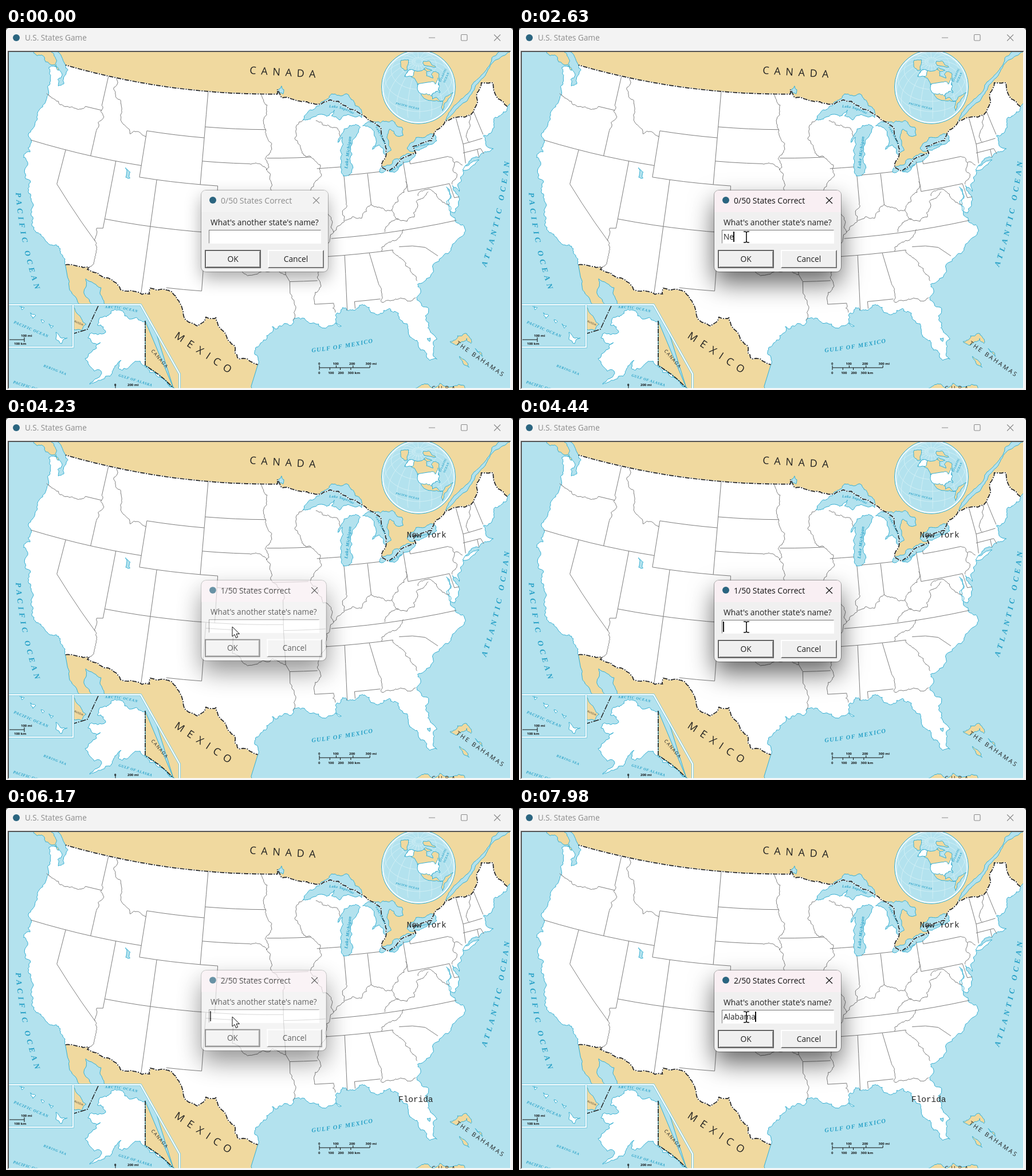
Write an HTML page that moves like this. It is 885 px wide and 633 px high and loops after 8000 ms.

```html
<!DOCTYPE html>
<html lang="en">
<head>
<meta charset="utf-8">
<title>States quiz</title>
<style>
  html, body { margin: 0; width: 100%; height: 100%; overflow: hidden; background: #555; }
  div, span, i { position: absolute; box-sizing: border-box; white-space: pre; }
  #stage, svg { position: absolute; left: 0; top: 0; width: 885px; height: 633px; overflow: hidden; }
  #stage { background: #f0f0f0; border-radius: 6px 6px 0 0; font: 13.8px/20px "Open Sans", "Noto Sans", sans-serif; color: #222; }
  #bar { left: 0; top: 0; width: 885px; height: 39px; background: #f3f3f3; color: #8b8b8b; }
  #bar.on, #dialog.on .title { color: #111; }
  #bar span { left: 33px; top: 7px; font-size: 13.6px; }
  .icon { width: 12px; height: 12px; border-radius: 50%; background: #2b6580; }
  #dialog { left: 341px; top: 284px; width: 221px; height: 142px; border-radius: 8px; background: #f0f0f0;
    transform-origin: 16px 19px; box-shadow: 0 0 0 1px #0004, 0 12px 30px #0005; }
  #dialog.on { box-shadow: 0 0 0 1px #0005, 0 20px 44px #0009; }
  .title { left: 0; top: 0; width: 221px; height: 38px; border-radius: 8px 8px 0 0; background: #f3f3f3; color: #8b8b8b; }
  #dialog.on .title { background: #f9eff3; }
  #score { left: 34px; top: 8px; font-size: 14px; }
  #entry { left: 13px; top: 69px; width: 196px; height: 24px; background: #fff; border: 1px solid; border-color: #777 #fff #fff #777; }
  #typed { position: static; font-size: 13.6px; line-height: 22px; margin-left: 2px; }
  #caret { position: relative; display: inline-block; width: 2px; height: 18px; margin: 0 -1px; vertical-align: -4px; background: #111; }
  .button { top: 104px; width: 98px; height: 32px; text-align: center; line-height: 28px; background: #f0f0f0;
    border: 2px solid; border-color: #fff #777 #777 #fff; }
  .button.main { border-color: #646464; box-shadow: inset 1px 1px #fff, inset -1px -1px #999; }
</style>
</head>
<body>
<div id="stage">
  <svg id="map" viewBox="0 0 885 633"></svg>
  <div id="bar">
    <i class="icon" style="left:12px;top:11px"></i><span>U.S. States Game</span>
    <svg viewBox="0 0 885 633" fill="none" stroke="currentColor" stroke-width="1.1">
      <path d="M738 17H749M852 11.500L863 22.500M863 11.500L852 22.500"/>
      <rect x="794.500" y="11.500" width="10.500" height="10.500" rx="1.500"/>
    </svg>
  </div>
  <div id="dialog">
    <div class="title">
      <i class="icon" style="left:14px;top:11px"></i><span id="score"></span>
      <svg viewBox="0 0 885 633" stroke="currentColor" stroke-width="1.2"><path d="M195 12L206 23M206 12L195 23"/></svg>
    </div>
    <span style="left:16px;top:46px">What's another state's name?</span>
    <div id="entry"><span id="typed"></span><i id="caret"></i></div>
    <div class="button main" style="left:6px">OK</div>
    <div class="button" style="left:116px">Cancel</div>
  </div>
  <svg viewBox="0 0 885 633">
    <path id="arrow" d="M0 0V17L4 13.500 6.500 19.500 9.500 18.200 7 12.500H12.500Z" fill="#fff" stroke="#111"/>
    <path id="beam" d="M392 356H395.500L397 357.500 398.500 356H402M397 357V374M392 375H395.500L397 373.500 398.500 375H402" fill="none" stroke="#111" stroke-width="1.600"/>
  </svg>
</div>
<script>
const $ = id => document.getElementById(id);
const { sin, cos, sqrt, ceil, floor, hypot, abs, min, max, PI } = Math;
const SEA = '#b3e2ee', SAND = '#f0d99f', COAST = '#35afd2', INK = '#222', RAD = PI / 180;

// Projections of degrees west and north
function conic(w, n) {
  const k = .6029, r = 1170 * sqrt(1.3513 - 2 * k * sin(n * RAD)) / k, a = k * (96 - w) * RAD;
  return [462 + r * sin(a), r * cos(a) - 1173.5];
}
function globe(w, n) {
  const lon = (122 - w) * RAD, lat = n * RAD, tilt = 44 * RAD;
  const x = cos(lat) * sin(lon);
  const y = cos(tilt) * sin(lat) - sin(tilt) * cos(lat) * cos(lon);
  const front = sin(tilt) * sin(lat) + cos(tilt) * cos(lat) * cos(lon);
  const r = 62 / (front < 0 ? hypot(x, y) : 1);
  return [720 + r * x, 103 - r * y];
}
const flat = (x, y) => [x, y];

let seed = 7;
const random = () => (seed = seed * 16807 % 2147483647) / 2147483647;

// Polyline through the places; rough > 0 breaks it up by midpoint displacement
function trace(places, rough = 0, project = conic) {
  const p = places.trim().split(/\s+/).map(Number), points = [];
  for (let i = 0; i < p.length - 2; i += 2) {
    const dx = p[i + 2] - p[i], dy = p[i + 3] - p[i + 1];
    const steps = project === flat || rough ? 1 : ceil(max(abs(dx), abs(dy)) / 2);
    for (let s = 0; s < steps; s++) points.push(project(p[i] + dx * s / steps, p[i + 1] + dy * s / steps));
  }
  points.push(project(...p.slice(-2)));
  const split = (a, b) => {
    const dx = b[0] - a[0], dy = b[1] - a[1];
    if (!rough || hypot(dx, dy) < 4) return [b];
    const shift = rough * (random() - .5);
    const mid = [(a[0] + b[0]) / 2 - dy * shift, (a[1] + b[1]) / 2 + dx * shift];
    return [...split(a, mid), ...split(mid, b)];
  };
  return points.flatMap((q, i) => i ? split(points[i - 1], q) : [q]).map(q => q.map(v => v.toFixed(1)).join(' ')).join(' ');
}

const path = (d, style) => `<path d="M${d}" ${style}/>`;
const fill = (d, color, edge = COAST) => path(d + 'Z', `fill="${color}" stroke="${edge}"`);
const line = (d, color, width = 1, dash = '') =>
  path(d, `fill="none" stroke="${color}" stroke-width="${width}" stroke-dasharray="${dash}"`);
const border = d => line(d, '#fff', 1.8) + line(d, INK, 1.7, '8 2 2 2');
const all = (list, draw) => list.map(draw).join('');

// Outline of the country, counterclockwise from the north-west
const WEST = '122.76 49 122.4 48.2 122.3 47.4 122.9 47.1 122.8 48.1 124.7 48.4 124.1 46.9 124 45 124.5 42.8 124.1 41.7 124.4 40.4 123.8 39.2 122.5 37.6 121.9 36.6 120.6 34.6 118.5 34 117.1 32.5 ';
const SOUTH = '117.1 32.5 114.7 32.7 114.8 32.5 111.1 31.3 108.2 31.3 108.2 31.8 106.5 31.8 104.9 30.6 104.5 29.6 103.1 29 102.4 29.8 101.4 29.8 100.3 28.3 99.5 27.5 99.1 26.4 97.2 25.9 ';
const GULF = '97.2 25.9 97.4 27.4 96.4 28.4 94.8 29.3 93.8 29.7 92.3 29.5 91.3 29.3 90.2 29.1 89.1 29 89.5 30.1 88 30.3 86.2 30.4 85.3 29.7 84.2 30.1 83.4 29.6 82.7 28.6 82.7 27.7 81.8 26.2 81.1 25.2 80.4 25.2 ';
const EAST = '80.4 25.2 80.1 26.9 80.6 28.4 81.4 30.5 81.1 31.8 79.3 33.1 77.9 33.9 76.6 34.7 75.5 35.2 76 36.8 76.4 37.2 76.3 38.2 76.2 39.5 75.9 37.2 75.1 38.4 75.5 39.5 74.9 38.9 74 40.5 73.6 40.9 71.9 41.3 70.7 41.6 70 41.7 70.7 42.1 70.7 43 69 44.1 67 44.8 ';
const NORTH = '67 44.8 67.8 45.7 67.8 47.1 69.2 47.4 70 46.7 70.3 45.9 71.5 45 74.7 45 76.3 44.2 76.8 43.6 79.1 43.4 78.9 42.8 82.4 41.7 83.1 42.1 82.4 43 82.5 45.3 83.6 46.1 84.9 46.9 88.4 48.3 89.6 48 92 48.3 94.6 48.7 95.15 49.4 95.15 49 ';
const west = trace(WEST, .5), south = trace(SOUTH, .25), gulf = trace(GULF, .6), east = trace(EAST, .5);
const north = trace(NORTH, .2) + ' ' + trace('95.15 49 122.76 49');

const lakes = [
  '92 46.7 90.8 46.9 89 46.9 88 47.4 88.4 46.9 87.4 46.5 85 46.7 84.7 46.5 84.8 47.3 86.3 48.7 88.2 48.8 89.3 48.2 90.5 47.6 92 46.7',
  '87.6 41.7 87 41.7 86.4 42.3 86.5 43.8 86.1 44.7 85 45.7 85.5 46 87 45.7 87.9 44.6 87.3 45 87.7 43.9 87.8 42.5 87.6 41.7',
  '84.7 45.8 83.4 45.2 83.3 44.3 83.9 43.7 83 44 82.4 43 81.7 43.4 81.5 45.2 80.9 44.6 80 44.5 80 45.2 81 45.9 84 46.1 84.7 45.8',
  '83.4 41.7 81.7 41.5 80 42.2 78.9 42.8 80.2 42.8 81.5 42.6 83.1 42.1 83.4 41.7',
  '79.8 43.3 77 43.3 76.2 43.5 76.4 44.1 77.5 44 79.4 43.7 79.8 43.3',
  '112.8 41.6 112.2 41.3 112.1 40.8 112.6 40.8 112.8 41.6', '95.2 49.1 94.6 49.7 94.4 49 95.2 49.1', '81 27.1 80.7 27.1 80.8 26.8 81 27.1'
];
const straight = [
  '117.04 49 117.04 46.4', '119 46 116.9 46', '124.2 42 111.05 42', '120 42 120 39 114.6 35', '114.04 42 114.04 36.2 114.7 36.1', '117.03 44.2 117.03 42',
  '104.05 45 111.05 45 111.05 41 102.05 41 102.05 37', '104.05 49 104.05 41', '109.05 41 109.05 31.3', '104.05 45.94 96.6 45.94', '104.05 43 98.5 43',
  '102.05 40 95.3 40', '114.04 37 94.62 37', '103 37 103 32 106.6 32', '103 36.5 100 36.5 100 34.5', '94.62 39.1 94.62 36.5 94.45 33.6 94.04 33 91.2 33', '94.04 33 94.04 32'
];
const older = [
  '94.62 36.5 90.1 36.5', '96.45 43.5 91.2 43.5', '95.8 40.6 91.7 40.6', '90.6 42.5 87.8 42.5', '87.53 41.7 87.53 39.4', '84.8 41.7 84.8 39.1', '87 41.75 83.4 41.73',
  '80.52 42.3 80.52 39.72 75.8 39.72 75.6 38.46 75.05 38.45', '79.76 42.3 79.76 42 75.3 42', '89.5 36.5 75.9 36.55', '90.3 35 83.1 35', '88.2 35 88.4 30.3', '85.6 35 85 32.3',
  '87.6 30.4 87.6 31 85 31', '91.6 31 89.7 31', '73.35 45 73.25 42.7 73.5 41.1', '73.25 42.74 70.9 42.8', '73.5 42 71.4 42 71.2 41.5', '71.8 42 71.85 41.3', '71.1 45.3 70.7 43.1', '82.4 35.2 81 35.1 79.7 34.8 78.55 33.9'
];
const rivers = [
  '124 46.2 122.8 45.9 121.2 45.6 119 46', '117.04 46.4 116.5 45.5 117.03 44.2', '116.05 49 116.05 48 114.6 46.6 114.4 45.5 113 44.5 111.05 44.5', '114.7 36.1 114.6 35 114.3 34.2 114.7 32.7',
  '98.5 43 96.5 42.5 95.8 40.6 94.62 39.1', '97.2 49 96.8 47 96.6 45.94 96.45 42.5', '100 34.5 97.2 33.8 94.45 33.6',
  '92 46.7 92.9 45.6 92.7 44.7 91.2 43.5 90.2 41.8 91.1 41 91.4 40.4 90.2 38.7 89.2 37 90.1 35 91.1 33.6 91.1 32.2 91.6 31', '90.4 46.6 88.1 45.9 87.6 45.1'
];
const eastRivers = [
  '87.53 39.4 88 37.9', '89.2 37 88 37.8 86 38 84.8 39.1 82.6 38.4 81.8 39 80.6 40.6', '82.6 38.4 82 37.5 83.7 36.6', '82 37.5 80.3 37.5 78.3 39.4',
  '79.5 39.2 78.4 39.6 77.7 39.3 77 38.3 76.3 38', '84.3 35 83 35.8 81.7 36.6', '83.1 35 82 33.5 81.1 32.1', '85 32.3 84.9 30.7 82.2 30.5 81.5 30.7',
  '94.04 32 93.6 31 93.8 29.7', '89.7 31 89.6 30.2', '75.3 42 74.7 41.36 75.1 40.7 74.8 40.2 75.5 39.6', '74.7 41.36 73.9 41', '71.5 45 72 44 72.5 42.74'
];
const islands = ['123.4 48.4 125 48.8 128 50.5 127 50.8 124.8 49.7 123.4 48.4', '84 22.8 82.4 23.1 80.5 23.1 78 22 84 21',
  '78.9 26.5 77.2 26.9 77 26 77.3 26.5 78.9 26.5', '78.3 25.1 77.8 24.6 77.6 24 78.1 24.5 78.3 25.1', '76.7 25.5 76.2 25 76.2 24.7'];

const land = fill(north + ' ' + trace('123.2 49.3 125 50.2 128 51.5 128 58 60 58 60 46 66 45.2', .2), SAND) +
  fill(south + ' ' + trace('97.8 24 97.7 22 105 21 109 25 112.3 29 113.1 31.2 114.8 31.7 114.7 30.5 113 28 112 26 114 28 115.8 30.2 116.6 31.5', .3), SAND) +
  fill(trace('74.7 45 71.2 46.8 69.5 47.8 67 49.2 62 50 64 49.2 67.5 48.6 70 47.3 73.5 45.5', .2), SEA) +
  path([west, south, gulf, east, north].join(' ') + 'Z', 'fill="#fff"') +
  all([west, gulf, east], d => line(d, COAST)) +
  all(islands, d => fill(trace(d, .5), SAND)) +
  fill(trace('74 40.6 72.5 40.8 71.9 41.1 73.6 40.9', .3), '#fff') +
  all(lakes, d => fill(trace(d, .4), SEA)) +
  all([...straight, ...older], d => line(trace(d), '#7d7d7d')) +
  all([...rivers, ...eastRivers], d => line(trace(d, .45), '#7d7d7d')) +
  border(north) + border(south);

const around = '168 66 156 71 128 70 95 72 82 68 95 60 88 57 80 52 78 59 65 60 56 52 66 45 76 36 81 31 80 25 83 30 90 30 97 27 97 20 90 21 83 10 78 8 85 11 95 16 105 20 117 32 124 40 124 48 135 58 150 60 165 55';
const onGlobe = d => trace(d, .3, globe);
const rings = Array.from({ length: 18 }, (_, i) => `${i * 20} -20 ${i * 20} 85`)
  .concat([0, 20, 40, 60, 80].map(n => `0 ${n} 360 ${n}`));
const world = `<circle cx="720" cy="103" r="64.500" fill="${SEA}" stroke="${COAST}"/><circle cx="720" cy="103" r="62.500" fill="none" stroke="#fff" stroke-width="2"/>` +
  all(rings, d => line(trace(d, 0, globe), '#d9f1f7', .8)) +
  all([around, '73 78 60 82 25 82 20 72 43 60 53 68', '172 66 190 70 235 72 235 58 200 60 180 62', '78 8 72 12 60 8 45 0 78 -15 80 0', '85 66 65 63 78 73 90 73'], d => fill(onGlobe(d), SAND)) +
  fill(onGlobe(WEST + SOUTH + GULF + EAST + NORTH), '#fff') + fill(onGlobe('141 70 141 60 152 59 163 55 165 62 166 68 156 71'), '#fff');

// Lettering
const label = (x, y, turn, size, gap, text, color = INK, font = 'Open Sans,sans-serif', extra = 'font-weight="500"') =>
  `<text transform="translate(${x} ${y})rotate(${turn})" font-family="${font}" font-size="${size}" letter-spacing="${gap}" fill="${color}" ${extra}>${text}</text>`;
const water = (x, y, turn, size, gap, text) =>
  label(x, y, turn, size, gap, text, '#249fc6', 'Liberation Serif,serif', 'font-style="italic" font-weight="bold"');
let curves = 0;
const curved = (d, size, gap, text) => `<path id="curve${++curves}" d="${d}" fill="none"/>` +
  water(0, 0, 0, size, gap, `<textPath href="#curve${curves}">${text}</textPath>`);
const small = (x, y, text) => label(x, y, 0, 6, 0, text, '#111', 'Open Sans,sans-serif', 'font-weight="bold"');

const names = curved('M564 139Q590 139 612 155', 6.5, .5, 'Lake Superior') + water(596, 246, -83, 8, .5, 'Lake Michigan') +
  water(645, 173, 63, 6, .4, 'Lake Huron') + water(670, 252, -28, 5.5, .3, 'Lake Erie') + water(712, 210, -14, 4.5, .2, 'Lake Ontario') +
  curved('M17 288Q23 375 54 466', 13.5, 5.8, 'PACIFIC OCEAN') + curved('M838 418Q866 340 880 226', 13.5, 5.6, 'ATLANTIC OCEAN') +
  curved('M534 567Q585 562 660 546', 10.5, 1.4, 'GULF OF MEXICO') +
  water(680, 133, 14, 5, .3, 'PACIFIC OCEAN') + water(759, 95, -66, 5, .2, 'ATLANTIC') + water(766, 96, -66, 5, .4, 'OCEAN') +
  label(425, 80, 3.5, 18, 8.7, 'CANADA') + label(293, 541, 33.5, 18, 9.6, 'MEXICO') +
  label(785, 553, 35, 10.5, 2.7, 'THE BAHAMAS') + label(743, 634, 0, 10, 5, 'CUBA');
const scale = line('547 594H635', '#111', 1.2) +
  all([0, 1, 2, 3], i => {
    const unit = (i * 100 || '0'), end = i === 3;
    return line(`${547 + i * 29.4} 590V594M${547 + i * 18.3} 594V598`, '#111') +
      small(545 + i * 28.5 - (i && 3), 589, unit + (end ? ' mi' : '')) + small(545 + i * 17.2, 605, unit + (end ? ' km' : ''));
  });

const alaska = '243 512 225 507 205 497 185 494 170 505 160 520 174 532 146 535 143 542 165 550 158 560 138 578 154 600 166 600 160 612 146 623 167 615 190 591 201 581 196 595 223 585 243 590 258 600 274 612 290 627 262 607 243 593';
const hawaii = [[97, 542, 10], [79, 521, 4], [64, 513, 3], [47, 503, 5], [28, 489, 4]];
const edge = '243 512 243 590 258 600 274 612 292 629';
const inset = `<g clip-path="url(#inset)"><rect y="480" width="310" height="153" fill="${SEA}"/>` +
  fill('256 514 320 640 292 629 ' + edge, SAND) + fill(trace(alaska, .5, flat), '#fff') +
  fill(trace('118 488 124 499 140 518 132 529 118 527', .3, flat), SAND) +
  all(hawaii, ([x, y, r]) => fill(trace(`${x - r} ${y - r} ${x + r} ${y} ${x} ${y + r} ${x - r} ${y - r}`, .5, flat), '#fff')) +
  line(edge, INK, 1.6, '8 2 2 2') + line('161 486 142 527 119 534', INK, 1.5, '10 2 2 2') +
  curved('M173 490Q205 489 240 501', 6.5, .8, 'ARCTIC OCEAN') + water(13, 516, 23, 7, .9, 'PACIFIC OCEAN') +
  water(65, 592, 21, 6, .7, 'BERING SEA') + water(196, 609, 17, 6.5, .5, 'GULF OF ALASKA') + water(12, 621, 17, 7, .5, 'PACIFIC OCEAN') +
  label(253, 565, 49, 8, 1.5, 'CANADA') + label(119, 514, 24, 4.5, .3, 'RUSSIA') +
  small(26, 540, '100 mi') + small(14, 554, '100 km') + line('6 545H32M32 541V549M191 623V632', '#111') +
  small(189, 626, '0') + small(212, 626, '200 mi') + '</g>' +
  all(['5 484H235L303 605V630', '5 558H117V484'], d => line(d, '#7fcbe0', 4) + line(d, '#fff', 2));

const answers = [['New York', 699.5, 209], ['Florida', 685, 514]];
$('map').innerHTML = `<defs><clipPath id="frame"><path d="M5 42H880V630H5Z"/></clipPath><clipPath id="inset"><path d="M5 484H235L303 605V630H5Z"/></clipPath></defs>
  <g clip-path="url(#frame)"><rect width="885" height="633" fill="${SEA}"/>${land + world + inset + scale + names}</g>` +
  line('4 631V41H881', '#555', 2) + line('881 41V630.5H4', '#fff', 1.5) +
  all(answers, ([name, x, y], i) => label(x, y, 0, 14.4, 0, name, INK, 'Liberation Mono,monospace', `id="answer${i}"`));

// Each run of keys: start, ms per key, text kept, text added
const runs = [
  [0, 1, '', ''], [1520, 160, '', 'ne'], [2140, 1, '', ''], [2400, 180, '', 'New '], [3160, 150, 'New ', 'York'],
  [4090, 1, '', ''], [4710, 120, '', 'Florida'], [5980, 1, '', ''], [6580, 1, '', 'A'], [6910, 160, 'A', 'labama']
];
const submits = [3880, 5770], focuses = [770, ...submits.map(s => s + 400)], STEP = 70;
const show = (id, on) => $(id).style.visibility = on ? 'visible' : 'hidden';

function draw(t) {
  let opacity = 1, closing = false, score = 0;
  submits.forEach((start, i) => {
    const k = floor((t - start) / STEP);
    if (k >= 3) score++;
    show('answer' + i, k >= 2);
    if (k < 0 || k > 6) return;
    opacity = min(1, max(0, .7 - .35 * k, .35 * (k - 3)));
    closing = k < 4;
  });
  const [start, pace, kept, added] = runs.findLast(r => r[0] <= t);
  const focus = focuses.findLast(f => f <= t);
  $('dialog').style.opacity = opacity;
  $('dialog').style.transform = `scale(${1 - .053 * (1 - opacity)})`;
  $('dialog').className = focus ? 'on' : '';
  $('bar').className = closing ? 'on' : '';
  $('score').textContent = score + '/50 States Correct';
  $('typed').textContent = kept + added.slice(0, floor((t - start) / pace) + 1);
  $('caret').style.visibility = (t - focus) % 900 < 600 ? 'inherit' : 'hidden';

  const p = min(1, max(0, (t - 70) / 630)), ease = 1 - (1 - p) ** 2;
  const beam = p === 1 && opacity === 1;
  $('arrow').setAttribute('transform', `translate(${673 - 278 * ease} ${541 - 176 * ease})`);
  show('arrow', t >= 70 && !beam);
  show('beam', beam);
}

function tick() {
  draw(performance.now() % 8000);
  requestAnimationFrame(tick);
}
tick();
</script>
</body>
</html>
```
